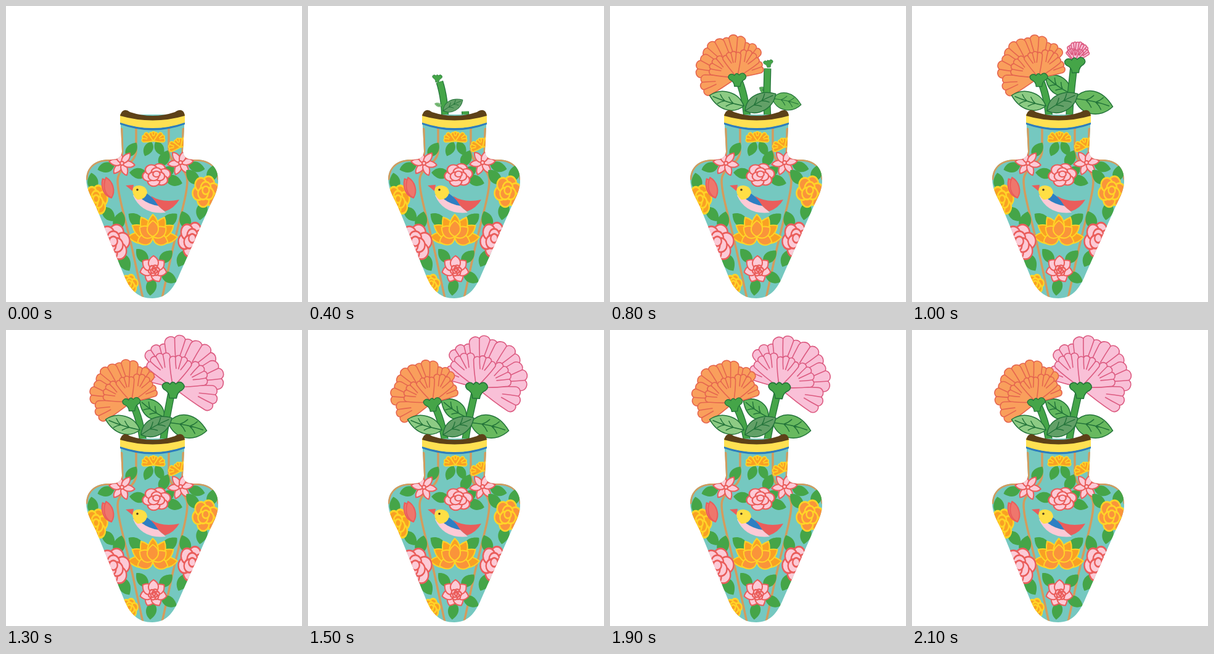
These frames come from a looping animation (480 px wide and 480 px high, 2.2 s). An HTML page:

```html
<!DOCTYPE html>
<html lang="en">
<head>
<meta charset="utf-8">
<title>Vase in bloom</title>
<style>
  html, body { margin: 0; width: 100%; height: 100%; overflow: hidden; background: #fff; }
  svg { display: block; width: 100vw; height: 100vh; stroke-linejoin: round; stroke-linecap: round; }
  .stem { fill: none; stroke-linecap: butt; }
</style>
</head>
<body>
<svg viewBox="0 0 480 480">
  <defs>
    <clipPath id="body">
      <path d="M185 176L188 236Q187 250 169 249C150 248 131 257 130 280C130 297 139 311 145 323L191 436C202 462 215 474 237 474C259 474 271 460 281 436L331 323C337 311 345 297 344 280C343 257 325 248 306 249Q288 250 287 236L290 176Z"/>
    </clipPath>
  </defs>
  <g id="plants"></g>
  <g id="vase"></g>
</svg>
<script>
const LOOP = 2200, STEP = 100;
const GREEN = '#45a548', DARK = '#23743a', PINK = '#fccad6', RED = '#ea5d5b';
const GOLD = '#ffd428', AMBER = '#f9a023', TANGERINE = '#fa943a';

const fix = n => +n.toFixed(2);
const polar = (deg, r) => {
  const a = deg * Math.PI / 180;
  return [fix(r * Math.sin(a)), fix(-r * Math.cos(a))];
};
const range = n => [...Array(n).keys()];
const path = (d, attrs = '') => `<path d="${d}" ${attrs}/>`;
const group = (transform, inner, attrs = '') => `<g transform="${transform}" ${attrs}>${inner}</g>`;
const paint = (fill, line, width) => `fill="${fill}" stroke="${line}" stroke-width="${width}"`;

const ramp = (t, from, to) => Math.min(1, Math.max(0, (t - from) / (to - from)));
const easeOut = x => x * (2 - x);

const blade = (l, w) =>
  `M0 0C${l * .22} ${-w * 1.35} ${l * .65} ${-w * 1.35} ${l} 0C${l * .75} ${w * 1.3} ${l * .25} ${w * 1.4} 0 0Z`;

// A fan with a scalloped end.
function petal(dir, len, half, bumps = 3) {
  const at = (u, q = 1) => polar(dir + u * half, len * q * (1 - .1 * u * u));
  let d = `M0 0Q${at(-1.15, .6)} ${at(-1)}`, veins = '';
  for (const i of range(bumps)) {
    const u = 2 * (i + 1) / bumps - 1, [x0, y0] = at(u - 2 / bumps), [x1, y1] = at(u);
    const r = fix(Math.hypot(x1 - x0, y1 - y0) * .55);
    d += `A${r} ${r} 0 0 1 ${x1} ${y1}`;
    if (i < bumps - 1) veins += `M${at(u)}Q${at(u * .9, .8)} ${at(u * .6, .62)}`;
  }
  return path(d + `Q${at(1.15, .6)} 0 0Z`) + path(veins, 'fill="none"');
}

// ---- Growing plants ----

const CALYX = 'M-5 17Q-5 8 -14 4Q-20 -2 -13 -6Q-8 -8 -5 -4Q-1 -11 4 -5Q10 -11 15 -6Q20 -1 14 4Q7 7 6 17Z';

const orange = {
  side: -1, size: 68, cup: .85, lean: 5,
  stem: 'M223 188C221 160 217 138 207 116', head: '206 116', pivot: '222 180',
  fill: '#f99f5c', line: '#e5654f',
  grow: [0, 450], bloom: [400, 800]
};

const pink = {
  side: 1, size: 83, cup: 1.05, lean: -7,
  stem: 'M255 188C255 160 261 130 266 93', head: '267 92', pivot: '256 178',
  fill: '#f9c0d7', line: '#dc5a80',
  grow: [300, 850], bloom: [800, 1300]
};

// Wide back fans, then three shorter front ones; k closes them into a bud.
function bloom(p, k) {
  const open = Math.min(1, .1 + k * .95), size = p.size * k;
  const half = h => h * (.35 + .65 * open);
  const back = range(6).map(i => {
    const u = i * .4 - 1;
    return petal(p.side * (22 + 82 * u) * open, size * (1 + .1 * u - .25 * u * u), half(19));
  });
  const front = [-46, 46, 0].map(a =>
    petal((p.side * 14 + a) * open, size * (a ? .68 : .6), half(24), 4));
  return `<g ${paint(p.fill, p.line, 1.6)}>${back.join('')}${front.join('')}</g>`;
}

function plant(p, t) {
  const grow = ramp(t, ...p.grow), k = ramp(t, ...p.bloom);
  const cup = p.cup * easeOut(ramp(t, p.bloom[0] - 100, p.bloom[1] - 200));
  const swing = 2.6 + 2.6 * Math.sin((t - 1300) / 1000 * Math.PI);
  const angle = p.side * swing + p.lean * (1 - k) ** 2;
  const dash = `class="stem" pathLength="1" stroke-dasharray="${fix(grow)} 2"`;
  const stem = grow && path(p.stem, `${dash} stroke="${DARK}" stroke-width="12"`) +
    path(p.stem, `${dash} stroke="${GREEN}" stroke-width="9.5"`);
  const calyx = group(`scale(${fix(cup)})`, path(CALYX), paint(GREEN, DARK, 1.5));
  const head = group(`translate(${p.head})`, (k ? bloom(p, k) : '') + (cup ? calyx : ''));
  return grow ? group(`rotate(${fix(angle)} ${p.pivot})`, stem + head) : '';
}

function leaf(x, y, angle, l, w, fill, k) {
  if (!k) return '';
  let veins = `M0 0Q${l * .5} ${-w * .2} ${l * .9} 0`;
  for (const u of [.3, .55])
    for (const s of [-1, 1]) veins += `M${l * u} ${-w * .08}q${l * .1} ${s * w * .2} ${l * .17} ${s * w * .55}`;
  return group(`translate(${x} ${y}) rotate(${angle}) scale(${fix(easeOut(k))})`,
    path(blade(l, w)) + path(veins, 'fill="none"'), paint(fill, DARK, 1.5));
}

const plants = t =>
  leaf(257, 142, -146, 49, 14, '#62b85e', ramp(t, 750, 1000)) +
  plant(pink, t) +
  leaf(263, 150, 12, 64, 18, '#68b95f', ramp(t, 600, 1000)) +
  plant(orange, t) +
  leaf(217, 162, 197, 58, 14, '#8dcb84', ramp(t, 350, 800)) +
  leaf(219, 170, -29, 57, 14, '#62a067', ramp(t, 200, 700));

// ---- Vase ----

const ring = (n, dist, r, turn = 0) => range(n).map(i => {
  const [x, y] = polar(turn + i * 360 / n, dist);
  return `<circle cx="${x}" cy="${y}" r="${fix(r)}"/>`;
}).join('');

// Leaves pointing out from behind a flower of radius r.
const sprig = (x, y, r, dirs) => dirs.map(a =>
  group(`translate(${x} ${y}) rotate(${a - 90}) translate(${r * .7})`,
    path(blade(r * .35 + 22, r * .12 + 6), `fill="${GREEN}"`))).join('');

const rose = (x, y, rx, ry, fill, line, dirs) =>
  sprig(x, y, (rx + ry) / 2, dirs) +
  group(`translate(${x} ${y}) scale(1 ${fix(ry / rx)})`,
    ring(6, rx * .56, rx * .43, 20) + ring(3, rx * .24, rx * .37) + ring(1, rx * .08, rx * .25),
    paint(fill, line, 2.4));

// n pointed petals spread evenly over an arc, outer ones first.
const lily = (x, y, n, arc, l, w, fill, line, turn = 0) =>
  group(`translate(${x} ${y})`,
    range(n).map(i => (i / (n - 1) - .5) * arc)
      .sort((a, b) => Math.abs(b) - Math.abs(a))
      .map(a => group(`rotate(${fix(a + turn - 90)})`, path(blade(l, w)))).join(''),
    paint(fill, line, 2));

const star = (x, y, turn, dirs) =>
  sprig(x, y, 18, dirs) + lily(x, y, 6, 300, 21, 5, PINK, RED, turn) +
  `<circle cx="${x}" cy="${y}" r="3" ${paint(PINK, RED, 2)}/>`;

const marigold = (x, y, turn) => group(`translate(${x} ${y}) rotate(${turn})`,
  petal(-66, 18, 30) + petal(66, 18, 30) + petal(0, 14, 32), paint(AMBER, GOLD, 1.8));

const bird =
  path('M206 307Q220 339 259 335Q240 318 225 306Z', `fill="${PINK}"`) +
  path('M235 308Q254 320 281 314Q273 328 258 333Q246 326 235 308Z', `fill="${RED}"`) +
  path('M224 302Q237 307 247 324Q232 322 220 313Z', 'fill="#2d7fc3"') +
  path('M205 299Q206 291 216 291Q228 292 229 303Q225 315 213 314Q206 309 205 299Z', 'fill="#ffdf45"') +
  path('M194 291L207 290L205 300Z', `fill="${RED}"`) +
  '<circle cx="213" cy="298" r="1.8" fill="#4c3a20"/>';

function ribs() {
  const half =
    path('M211 198V236C209 258 181 260 181 284C181 306 195 350 206 400L222 474', 'stroke-width="3.5"') +
    path('M187 200L188 236Q187 250 169 249C150 248 131 257 130 280', 'stroke-width="5"');
  return `<g fill="none" stroke="#d49b5c">${half}${group('translate(475) scale(-1 1)', half)}</g>`;
}

function vase() {
  const art =
    '<rect x="120" y="170" width="240" height="310" fill="#75c8c0"/>' + ribs() +
    sprig(239, 214, 10, [150, 205]) + marigold(239, 219, 0) + marigold(283, 229, -20) +
    star(188, 255, 8, [35, -105]) + star(283, 254, -8, [105, -125]) +
    rose(244, 274, 23, 19, PINK, RED, [-85, 108, 25]) +
    rose(146, 315, 19, 25, AMBER, GOLD, [-10, 138]) +
    rose(324, 301, 22, 26, TANGERINE, GOLD, [-42, 20, 192]) +
    lily(171, 311, 2, 10, 34, 7, '#ef766c', RED, -20) +
    bird +
    sprig(238, 370, 28, [-50, 50]) +
    lily(238, 378, 7, 170, 40, 9, AMBER, GOLD) +
    lily(238, 374, 5, 220, 26, 9, TANGERINE, GOLD) +
    rose(174, 384, 27, 31, PINK, RED, [15, 150]) +
    rose(302, 379, 23, 29, PINK, RED, [-20, 207]) +
    sprig(239, 427, 20, [-40, 45, 118, 187]) +
    lily(239, 427, 7, 308, 22, 8, PINK, RED) +
    rose(240, 429, 9, 9, PINK, RED, []) +
    rose(200, 451, 14, 16, AMBER, GOLD, []);
  return `<g clip-path="url(#body)">${art}</g>` +
    path('M185 188Q238 208 290 188V192Q238 211 185 192Z', 'fill="#2d7dbd"') +
    path('M185 175Q238 192 290 175V189Q238 207 185 189Z', 'fill="#ffe052"') +
    path('M185 178Q187 170 192 169Q196 168 201 172Q238 184 274 172Q280 168 284 169Q289 170 290 178Q238 193 185 178Z', 'fill="#5d4118"');
}

document.getElementById('vase').innerHTML = vase();

const stage = document.getElementById('plants');
const start = performance.now();
let shown = -1;

function tick() {
  const t = Math.floor((performance.now() - start) % LOOP / STEP) * STEP;
  if (t !== shown) {
    stage.innerHTML = plants(t);
    shown = t;
  }
  requestAnimationFrame(tick);
}
tick();
</script>
</body>
</html>
```
